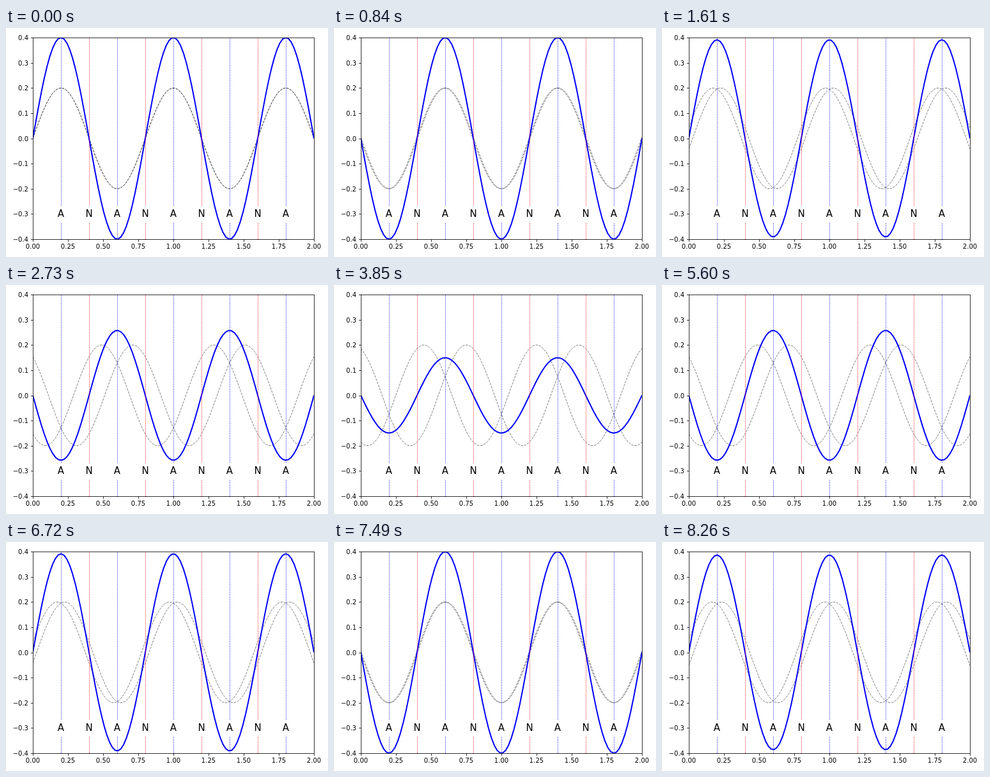
Write an HTML page that moves like this. It is 504 px wide and 360 px high and loops after 8330 ms.

```html
<!DOCTYPE html>
<html lang="en">
<head>
<meta charset="utf-8">
<title>Standing wave</title>
<style>
  html, body { margin: 0; width: 100%; height: 100%; overflow: hidden; background: #fff; }
  svg { display: block; }
  text { font: 10px "DejaVu Sans", sans-serif; fill: #000; }
  .mark { font-size: 15px; }
  .axis { stroke: #000; stroke-width: .8; fill: none; }
  .part { stroke: #000; stroke-opacity: .5; stroke-dasharray: 3.7 1.6; fill: none; }
  .sum { stroke: #00f; stroke-width: 2; fill: none; stroke-linejoin: round; }
  .guide { stroke-dasharray: 1 1.65; }
</style>
</head>
<body>
<svg id="stage" width="504" height="360" viewBox="0 0 504 360">
  <clipPath id="plot"><rect x="42" y="15" width="440" height="317"/></clipPath>
</svg>
<script>
const LEFT = 42, RIGHT = 482, TOP = 15, BOTTOM = 332;
const STEP_MS = 70, STEPS = 119, CYCLES = 5;
const WAVELENGTH = 0.8, AMPLITUDE = 0.2, SAMPLES = 100;

const stage = document.getElementById('stage');
const px = x => LEFT + x * (RIGHT - LEFT) / 2;
const py = y => (TOP + BOTTOM) / 2 - y * (BOTTOM - TOP) / 0.8;
const snap = v => Math.floor(v + 0.5) + 0.5;

function add(tag, attrs, parent = stage, text = '') {
  const el = document.createElementNS('http://www.w3.org/2000/svg', tag);
  for (const key in attrs) el.setAttribute(key, attrs[key]);
  el.textContent = text;
  return parent.appendChild(el);
}

const plot = add('g', { 'clip-path': 'url(#plot)' });
const forward = add('path', { class: 'part' }, plot);
const backward = add('path', { class: 'part' }, plot);
const total = add('path', { class: 'sum' }, plot);

// Antinodes (A) and nodes (N)
for (let i = 1; i <= 9; i++) {
  const isAntinode = i % 2 === 1;
  const x = px(i * 0.2);
  add('path', {
    class: 'guide', stroke: isAntinode ? '#00f' : '#f00',
    d: `M${snap(x)} ${BOTTOM}V${TOP}`
  }, plot);
  add('rect', { x: x - 10, y: 279.5, width: 20, height: 26, fill: '#fff' });
  add('text', { class: 'mark', x, y: 297, 'text-anchor': 'middle' }, stage, isAntinode ? 'A' : 'N');
}

add('rect', {
  class: 'axis', x: LEFT + 0.5, y: TOP + 0.5,
  width: RIGHT - LEFT, height: BOTTOM - TOP
});
for (let i = 0; i <= 8; i++) {
  const xValue = i / 4, yValue = (i - 4) / 10;
  const x = px(xValue), y = py(yValue);
  add('path', { class: 'axis', d: `M${snap(x)} ${BOTTOM + 0.5}v3.5` });
  add('path', { class: 'axis', d: `M${LEFT + 0.5} ${snap(y)}h-3.5` });
  add('text', { x, y: 347, 'text-anchor': 'middle' }, stage, xValue.toFixed(2));
  add('text', { x: 35, y: Math.round(y + 4), 'text-anchor': 'end' }, stage,
    yValue.toFixed(1).replace('-', '\u2212'));
}

function curve(wave) {
  let d = '';
  for (let i = 0; i < SAMPLES; i++) {
    const x = 2 * i / (SAMPLES - 1);
    d += `${i ? 'L' : 'M'}${px(x).toFixed(2)} ${py(wave(x)).toFixed(2)}`;
  }
  return d;
}

function draw(ms) {
  const step = Math.floor(ms / STEP_MS) % STEPS;
  const phase = 2 * Math.PI * CYCLES * step / STEPS;
  const k = 2 * Math.PI / WAVELENGTH;
  const right = x => AMPLITUDE * Math.sin(k * x - phase);
  const left = x => AMPLITUDE * Math.sin(k * x + phase);
  forward.setAttribute('d', curve(right));
  backward.setAttribute('d', curve(left));
  total.setAttribute('d', curve(x => right(x) + left(x)));
}

const start = performance.now();
function tick() {
  draw(performance.now() - start);
  requestAnimationFrame(tick);
}
tick();
</script>
</body>
</html>
```
